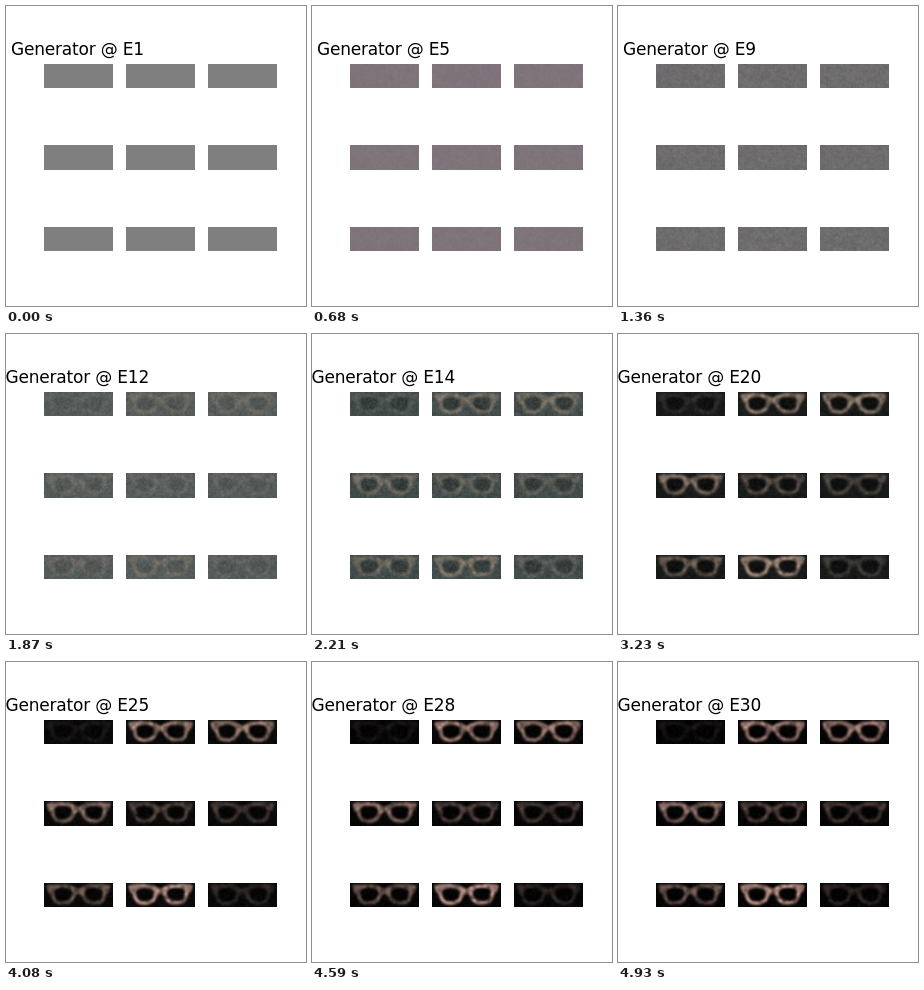
Write an HTML page with a canvas that moves like this. It is 300 px wide and 300 px high and loops after 5.1 s.

```html
<!DOCTYPE html>
<html>
<head>
<meta charset="utf-8">
<style>
html, body { margin: 0; width: 100%; height: 100%; overflow: hidden; background: #fff; }
canvas { display: block; width: 300px; height: 300px; }
</style>
</head>
<body>
<canvas id="stage" width="300" height="300"></canvas>
<script>
const ctx = document.getElementById('stage').getContext('2d');
const STEP = 170, EPOCHS = 30, W = 69, H = 25;
// How clearly each sample ends up showing its glasses
const CLARITY = [0.1, 0.85, 0.8, 0.72, 0.4, 0.34, 0.54, 1, 0.22];

const mix = (a, b, k) => a + (b - a) * k;
const mixColour = (a, b, k) => a.map((v, i) => mix(v, b[i], k));
const bump = (x, centre, width) => Math.exp(-(((x - centre) / width) ** 2));
function ease(from, to, x) {
  const k = Math.max(0, Math.min(1, (x - from) / (to - from)));
  return k * k * (3 - 2 * k);
}

function hash(x, y, s) {
  let h = Math.imul(x, 374761393) ^ Math.imul(y, 668265263) ^ Math.imul(s + 11, 1274126177);
  h = Math.imul(h ^ (h >>> 16), 2246822507);
  h = Math.imul(h ^ (h >>> 13), 3266489909);
  return ((h ^ (h >>> 16)) >>> 0) / 4294967296;
}

function valueNoise(x, y, s) {
  const i = Math.floor(x), j = Math.floor(y), u = x - i, v = y - j;
  return mix(mix(hash(i, j, s), hash(i + 1, j, s), u),
             mix(hash(i, j + 1, s), hash(i + 1, j + 1, s), u), v);
}

// Red holds the frame, green the lenses
function makeMask() {
  const c = document.createElement('canvas');
  c.width = W;
  c.height = H;
  const g = c.getContext('2d');
  g.fillStyle = '#000';
  g.fillRect(0, 0, W, H);
  g.filter = 'blur(0.9px)';
  const body = new Path2D('M2.5 2Q14 0.5 24 1.5Q30 2.5 34.6 6V10.5Q32 11 30.5 15Q28.5 19.5 24 21Q17 22.5 12 20.5Q8 18 6.5 11Q3 9 2.5 2Z');
  const lens = new Path2D('M10 8.5Q11 5 19 4.7Q27 5 28 8.5Q28.5 13 25.5 16Q22.5 18.5 18 18.5Q13 18.3 11 14.5Z');
  for (const [path, colour] of [[body, '#f00'], [lens, '#0f0']]) {
    g.fillStyle = colour;
    for (const side of [1, -1]) {
      g.setTransform(side, 0, 0, 1, side < 0 ? W : 0, 0);
      g.fill(path);
    }
  }
  return g.getImageData(0, 0, W, H).data;
}
const mask = makeMask();

// Grey fades to black, passing through a pink and then a teal cast
function look(epoch) {
  const level = 3 + 127 / (1 + Math.exp((epoch - 14.7) / 3.5));
  const pink = bump(epoch, 6, 2.5), teal = bump(epoch, 15, 4);
  return {
    back: [level + 5 * pink - 6 * teal, level - 8 * pink + 4 * teal, level + 2 * teal],
    front: mixColour([150, 132, 114], [178, 138, 128], ease(16, 30, epoch)),
    contrast: ease(8, 17, epoch),
    settled: ease(15, 23, epoch),
    grain: 6 * ease(1, 8, epoch) + 8 * bump(epoch, 14, 5),
    weave: 13 * ease(1, 4, epoch) * bump(epoch, 8.5, 5),
    shade: 0.43 * ease(10, 18, epoch)
  };
}

function drawSample(cell, style) {
  const { back, front, contrast, settled, grain, weave, shade } = style;
  const col = cell % 3, row = Math.floor(cell / 3);
  const height = row === 1 ? H : H - 1;
  const img = ctx.createImageData(W, height);
  const clarity = CLARITY[cell];
  const power = contrast * mix(0.2 + 0.75 * clarity, clarity, settled);
  for (let y = 0; y < height; y++) {
    for (let x = 0; x < W; x++) {
      const p = (y * W + x) * 4;
      const patch = valueNoise(x / 3.5, y / 3.5, cell);
      const fine = valueNoise(x / 1.4, y / 1.4, cell + 20);
      const frame = mask[p] / 255 * power * (0.6 + 0.7 * patch);
      const dim = 1 - shade * mask[p + 1] / 255;
      const noise = grain * (1.5 * fine + 0.9 * patch - 1.2);
      const knit = weave * (((x + y) % 2) + 0.6 * (x % 4 === 1) + 0.6 * (y % 4 === 2) - 0.8);
      const tint = [knit, -0.35 * knit, 0.25 * knit];
      for (let n = 0; n < 3; n++) {
        img.data[p + n] = mix(back[n] * dim, front[n], frame) + noise + tint[n];
      }
      img.data[p + 3] = 255;
    }
  }
  ctx.putImageData(img, 38 + 82 * col, Math.round(57.8 + 81.5 * row));
}

function draw(epoch) {
  ctx.fillStyle = '#fff';
  ctx.fillRect(0, 0, 300, 300);
  ctx.fillStyle = '#000';
  ctx.font = '17px "DejaVu Sans", sans-serif';
  ctx.letterSpacing = '-0.2px';
  ctx.fillText('Generator @ E' + epoch, epoch < 10 ? 5 : -0.5, 49);
  const style = look(epoch);
  for (let cell = 0; cell < 9; cell++) drawSample(cell, style);
}

let shown = 0;
const start = performance.now();
function tick() {
  const epoch = Math.floor(Math.max(0, performance.now() - start) / STEP) % EPOCHS + 1;
  if (epoch !== shown) draw(shown = epoch);
  requestAnimationFrame(tick);
}
tick();
</script>
</body>
</html>
```
